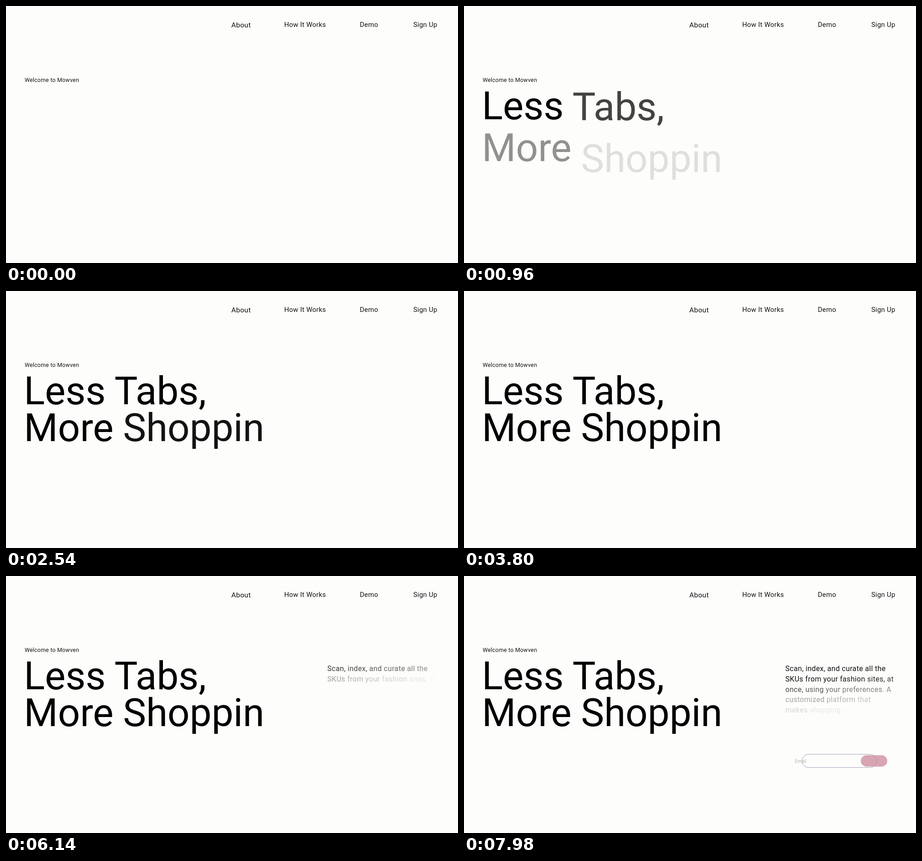
These frames come from a looping animation (991x565 px, 8000 ms). An HTML page:

```html
<!DOCTYPE html>
<html lang="en">
<head>
<meta charset="utf-8">
<title>Landing page intro</title>
<style>
  html, body { margin: 0; height: 100%; overflow: hidden; background: #fdfdfc; }
  svg { display: block; width: 100vw; height: 100vh; font-family: Roboto, sans-serif; }
  .small { letter-spacing: .02em; fill: #111; }
  .headline { font-size: 85.3px; }
  .intro { font-size: 16px; }
</style>
</head>
<body>
<svg viewBox="0 0 991 565">
  <g class="small" font-size="14.8">
    <text x="494" y="47" font-size="15.5">About</text>
    <text x="610" y="46.2">How It Works</text>
    <text x="775.8" y="46.2">Demo</text>
    <text x="893" y="46.2">Sign Up</text>
    <text x="41" y="167" font-size="12.3">Welcome to Mowven</text>
  </g>
  <g class="headline" id="headline"></g>
  <g class="small intro" id="intro"></g>
  <g id="form">
    <rect x="870" y="394" width="58" height="25" rx="12.5" fill="#ab3457"/>
    <rect id="field" y="392" height="29" rx="14.5" fill="none" stroke="#2a1a4a"/>
    <text x="725.5" y="410.6" font-size="10" fill="#555">Email</text>
  </g>
</svg>
<script>
const LOOP = 8000;
const byId = id => document.getElementById(id);
const clamp = v => Math.min(1, Math.max(0, v));

function add(parent, tag, attrs, text = '') {
  const el = document.createElementNS('http://www.w3.org/2000/svg', tag);
  for (const key in attrs) el.setAttribute(key, attrs[key]);
  el.textContent = text;
  return parent.appendChild(el);
}

// cubic-bezier(.25, .1, .25, 1)
function ease(x) {
  const bezier = (a, b, s) => 3 * a * s * (1 - s) ** 2 + 3 * b * s * s * (1 - s) + s ** 3;
  let lo = 0, hi = 1;
  for (let i = 0; i < 20; i++) {
    const mid = (lo + hi) / 2;
    if (bezier(.25, .25, mid) < x) lo = mid; else hi = mid;
  }
  return bezier(.1, 1, lo);
}

// The picture advances in uneven steps: 20, 20 and 100 ms.
function stepAt(ms) {
  const t = ms + 20, rest = t % 140;
  return 3 * Math.floor(t / 140) + (rest < 20 ? 0 : rest < 40 ? 1 : 2) - 1;
}

const headline = [
  ['Less', 39.3, 248.8], ['Tabs,', 237.8, 248.8],
  ['More', 39.3, 329.5], ['Shoppin', 256.5, 329.5],
].map(([word, x, y], i) => ({
  el: add(byId('headline'), 'text', { x, y }, word),
  start: -11.3 + 9.3 * i,
  slowEnd: i === 3,
}));

const introWords = [];
[
  'Scan, index, and curate all the',
  'SKUs from your fashion sites, at',
  'once, using your preferences. A',
  'customized platform that',
  'makes shopping easy',
].forEach((line, row) => {
  const text = add(byId('intro'), 'text', { x: 704.5, y: 209.3 + 22.65 * row });
  line.split(' ').forEach((word, i) => {
    if (i) text.append(' ');
    introWords.push(add(text, 'tspan', {}, word));
  });
});

function draw(ms) {
  const step = stepAt(ms);

  for (const { el, start, slowEnd } of headline) {
    const p = step ? clamp((step - start) / 30) : 0;
    const limit = slowEnd ? .9 + .1 * clamp((step - 47) / 40) : 1;
    el.setAttribute('opacity', Math.min(p, limit));
    el.setAttribute('transform', `translate(0 ${40 * (1 - ease(p))})`);
  }

  introWords.forEach((el, i) =>
    el.setAttribute('fill-opacity', clamp((step - 89 - 3.7 * i) / 50)));

  const p = clamp((step - 161) / 23);
  const width = 225 * ease(p);
  byId('form').setAttribute('opacity', p);
  byId('field').setAttribute('x', 823 - width / 2);
  byId('field').setAttribute('width', width);
}

function tick() {
  draw(performance.now() % LOOP);
  requestAnimationFrame(tick);
}
tick();
</script>
</body>
</html>
```
